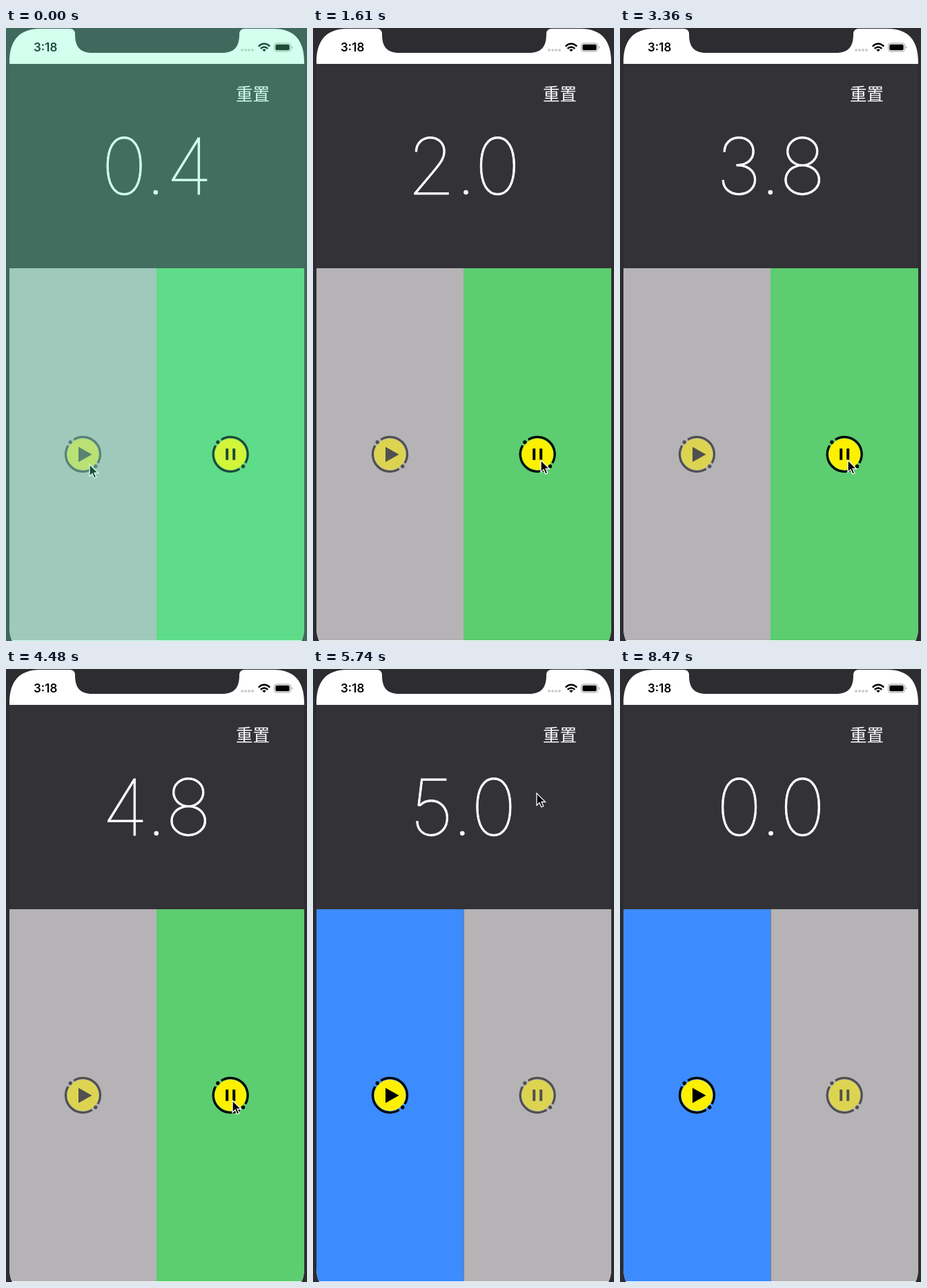
An HTML page for the animation above (8.54 s loop, 436 by 888 pixels).

```html
<!DOCTYPE html>
<html lang="zh">
<head>
<meta charset="utf-8">
<title>Stopwatch</title>
<style>
  html, body { margin: 0; width: 100%; height: 100%; overflow: hidden; background: #2d2c31; }
  svg { display: block; width: 100vw; height: 100vh; }
  text { font-family: Inter, sans-serif; }
  #count { font-size: 113px; font-weight: 100; fill: #fff; stroke: #fff; stroke-width: .8; text-anchor: middle; }
  #reset { font: 24.5px "Noto Sans CJK SC", "Noto Sans CJK", sans-serif; fill: #fff; }
  #clock { font-size: 17px; font-weight: 600; }
</style>
</head>
<body>
<svg viewBox="0 0 436 888">
  <defs>
    <clipPath id="screen">
      <path d="M5 50C5 18 19 1 50 1H92Q100 1 100 9C100 27 107 36 125 36H313C331 36 338 27 338 9Q338 1 346 1H387C418 1 432 18 432 50V868Q432 880 428 888H9Q5 880 5 868Z"/>
    </clipPath>
    <g id="badge">
      <circle r="22.8" fill="#fdf000"/>
      <g fill="none" stroke="#000" stroke-width="3.2">
        <path id="arc" d="M-13.3-21.2A25 25 0 0 1 21.6 12.6"/>
        <use href="#arc" transform="rotate(180)"/>
      </g>
      <circle cx="-18.3" cy="-17.5" r="2.7"/>
      <circle cx="18.3" cy="17.5" r="2.7"/>
    </g>
  </defs>

  <rect width="436" height="888" fill="#2d2c31"/>
  <g clip-path="url(#screen)">
    <rect width="436" height="888" fill="#fff"/>
    <rect y="52" width="436" height="296" fill="#333236"/>
    <rect id="playPane" y="348" width="218" height="539"/>
    <rect id="pausePane" x="218" y="348" width="218" height="539"/>
    <path id="divider" d="M218.5 348V887" stroke="#557" stroke-opacity=".6"/>
  </g>

  <text id="clock" x="40" y="34">3:18</text>
  <g fill="#ccc">
    <circle cx="342" cy="32" r="2"/><circle cx="347" cy="32" r="2"/>
    <circle cx="352" cy="32" r="2"/><circle cx="357" cy="32" r="2"/>
  </g>
  <g fill="none" stroke="#000" stroke-width="2.4">
    <path d="M365.8 26.6Q374 19 382.2 26.6M368.7 29.8Q374 25 379.3 29.8"/>
    <path d="M371.2 31.4Q374 29.4 376.8 31.4L374 34.2Z" fill="#000" stroke="none"/>
  </g>
  <rect x="388.5" y="22" width="24" height="12" rx="3.5" fill="none" stroke="#999"/>
  <rect x="390.3" y="23.8" width="20.4" height="8.4" rx="2"/>
  <path d="M414 26Q416.5 28 414 30Z" fill="#999"/>

  <text id="reset" x="333" y="104.5">重置</text>
  <text id="count" x="218.5" y="241"></text>

  <g id="playIcon" transform="translate(111.5 617.5)">
    <use href="#badge"/>
    <path d="M-6.5-10.8L13 0.3L-6.5 11.3Z"/>
  </g>
  <g id="pauseIcon" transform="translate(325.2 617.5)">
    <use href="#badge"/>
    <path d="M-7-8.3H-3V8.3H-7ZM3-8.3H7V8.3H3Z"/>
  </g>

  <path id="cursor" d="M0 0V17.4L4 13.7L6.8 20L9.8 18.7L7 12.5H12.5Z" stroke="#fff" stroke-width="1.3"/>
  <rect id="tint" width="436" height="888" fill="#67ffc5" opacity=".29"/>
</svg>

<script>
const LOOP = 8540, STEP = 70, PAUSED = 4620, RESET = 6510, CURSOR_GONE = 7280;
const $ = id => document.getElementById(id);

// Rows are [time, value...]
const counterKeys = [[0, .45], [770, 1.34], [2450, 2.85], [3360, 3.84], [4480, 4.86], [PAUSED, 5.01]];
const cursorKeys = [
  [0, 121, 632], [140, 121, 632], [770, 297, 633], [1120, 330, 626], [3360, 330, 626],
  [4480, 328, 625], [5110, 328, 625], [5740, 324, 180], [6230, 353, 94],
  [6720, 353, 94], [CURSOR_GONE, 440, 120]
];
const linear = p => p;
const smooth = p => p * p * (3 - 2 * p);

function sample(keys, t, ease) {
  const next = keys.findIndex(key => key[0] > t);
  if (next < 0) return keys.at(-1).slice(1);
  const a = keys[next - 1], b = keys[next];
  const p = ease((t - a[0]) / (b[0] - a[0]));
  return a.slice(1).map((v, i) => v + (b[i + 1] - v) * p);
}

function setButton(name, enabled, color) {
  $(name + 'Pane').setAttribute('fill', enabled ? color : '#b5b3b5');
  $(name + 'Icon').setAttribute('opacity', enabled ? 1 : .55);
}

function show(id, visible) {
  $(id).style.display = visible ? '' : 'none';
}

function draw(t) {
  const running = t < PAUSED;
  const seconds = t < RESET ? sample(counterKeys, t, linear)[0] : 0;
  $('count').textContent = (Math.floor(seconds * 10) / 10).toFixed(1);
  setButton('play', !running, '#3c8cff');
  setButton('pause', running, '#5ccd70');
  show('divider', !running);
  show('tint', t < STEP);
  show('cursor', t < CURSOR_GONE);
  $('cursor').setAttribute('transform', `translate(${sample(cursorKeys, t, smooth)})`);
}

const start = performance.now();
function tick() {
  const t = (performance.now() - start) % LOOP;
  draw(Math.floor(t / STEP) * STEP);
  requestAnimationFrame(tick);
}
tick();
</script>
</body>
</html>
```
